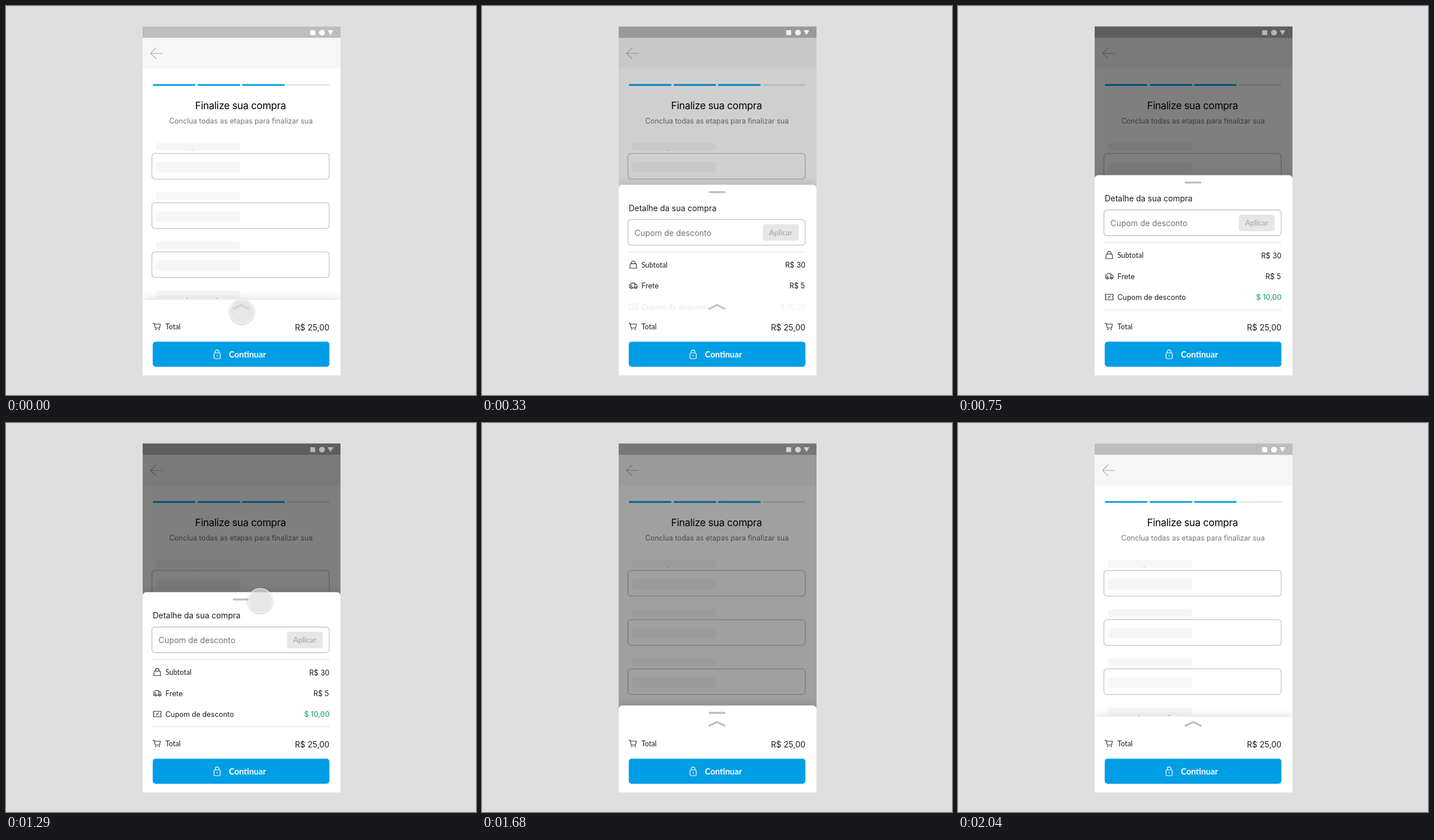
Recreate the animation shown at these times as an HTML page. Size 815x675 px, loop 2280 ms.

```html
<!DOCTYPE html>
<html lang="pt-BR">
<head>
<meta charset="utf-8">
<title>Finalize sua compra</title>
<style>
  html, body { margin: 0; width: 100%; height: 100%; overflow: hidden; background: #dfdfdf; }
  svg { display: block; width: 815px; height: 675px; }
  text { font-family: Inter, Roboto, sans-serif; font-size: 12.5px; fill: #1c1c1c; }
  .label { font-family: Lato, "Open Sans", sans-serif; font-size: 12.4px; }
  .bold { font-family: Lato, "Open Sans", sans-serif; font-weight: 700; }
  .end { text-anchor: end; }
  .mid { text-anchor: middle; }
  .line { fill: none; stroke: #2b2b2b; stroke-width: 1.1; stroke-linejoin: round; stroke-linecap: round; }
  .field { fill: #fff; stroke: #c2c2c2; stroke-width: 1.3; }
  .rule { stroke: #e4e4e4; stroke-width: 1.2; }
  .gray { fill: none; stroke: #bfbfbf; stroke-width: 3.4; stroke-linecap: round; stroke-linejoin: round; }
  #sheetBg { filter: drop-shadow(0 -4px 7px rgba(0, 0, 0, .1)); }
  #touch { filter: drop-shadow(0 1px 1.5px rgba(0, 0, 0, .35)); }
</style>
</head>
<body>
<svg viewBox="0 0 815 675">
  <clipPath id="phone"><rect x="237" y="35.5" width="343" height="605.5"/></clipPath>
  <g clip-path="url(#phone)">
    <rect x="237" y="35" width="343" height="607" fill="#fff"/>
    <rect x="237" y="35" width="343" height="20.5" fill="#bdbdbd"/>
    <rect x="237" y="55.5" width="343" height="53" fill="#f6f6f6"/>
    <path d="M271.5 82.3H250.7M260.5 72.5L250.5 82.3L260.5 91.5" fill="none" stroke="#aaa" stroke-width="1.1"/>
    <g id="steps" stroke-width="3" stroke-linecap="round"></g>
    <text x="328" y="179" style="font-size:17.3px;letter-spacing:-.29px;fill:#000">Finalize sua compra</text>
    <text x="283" y="203.5" style="font-size:12.45px;fill:#757575">Conclua todas as etapas para finalizar sua</text>
    <g id="form"></g>
    <path d="M322 250.5h1.2M313 507.5h1.5M365 507.5h2" stroke="#777"/>
    <rect id="shade" x="237" y="35" width="343" height="607"/>
    <path d="M527.5 42h8.6v8.6h-8.6zM557.8 42h9.8l-4.9 8.4z" fill="#fff" class="status"/>
    <circle cx="547.9" cy="46.2" r="5" fill="#fff" class="status"/>

    <g id="sheet">
      <rect id="sheetBg" x="237" y="293.5" width="343" height="420" rx="6" fill="#fff"/>
      <path class="gray" d="M394.7 306.3H420.5"/>
      <text x="254.5" y="339" style="font-size:13.95px">Detalhe da sua compra</text>
      <rect class="field" x="253" y="354" width="307.5" height="44.5" rx="5.5"/>
      <text x="264.5" y="382" style="font-size:13.95px;fill:#757575">Cupom de desconto</text>
      <rect x="487" y="362" width="62" height="28.7" rx="4" fill="#e6e6e6"/>
      <text class="bold mid" x="518" y="381.3" style="font-size:13px;fill:#b2b2b2">Aplicar</text>
      <path class="rule" d="M254 410.2H561M254 527.2H561"/>

      <path class="line" d="M257.3 430.5H267.2L268.3 438.3H256.2ZM259.2 430.3V429a3.1 3.1 0 0 1 6.2 0V430.3"/>
      <text class="label" x="276.5" y="437">Subtotal</text>
      <text class="end" x="561" y="437.5">R$ 30</text>

      <path class="line" d="M258 464.2H265V472.2H261.5M257 472.2H255.8V469.5M265 466.2H267.4L269 469V472.2H268M255 466.7H259M256.5 469H260"/>
      <circle class="line" cx="259.2" cy="472.4" r="1.5"/>
      <circle class="line" cx="266.3" cy="472.4" r="1.5"/>
      <text x="276.5" y="473.5">Frete</text>
      <text class="end" x="560" y="473.5">R$ 5</text>

      <path class="line" d="M255.5 500.3H269V503.2Q266.8 505 269 506.8V509.7H255.5V506.8Q257.7 505 255.5 503.2ZM260.3 507.2L264.3 502.8"/>
      <path class="line" d="M260.4 503.3h.2M264 506.8h.2" stroke-width="1.6"/>
      <text x="276.5" y="510" style="font-size:12.4px">Cupom de desconto</text>
      <text class="end" x="561" y="510" style="font-weight:500;fill:#27a974">$ 10,00</text>
    </g>

    <g id="cover">
      <rect x="237" y="510" width="343" height="132" fill="#fff"/>
      <path class="gray" d="M394.5 525.2L407.6 518.8L420.8 525.2"/>
    </g>

    <path class="line" d="M254.7 550.5H256.8L258.8 558.7H266.3L267.8 552H257.4"/>
    <path class="line" d="M259.6 561.3h.2M265.6 561.3h.2" style="stroke-width:1.9"/>
    <text class="label" x="276.5" y="561">Total</text>
    <text class="end" x="561" y="562.5" style="font-size:14.05px">R$ 25,00</text>
    <rect x="254.5" y="582.5" width="306.3" height="43.5" rx="5" fill="#009ee5"/>
    <g fill="none" stroke="#fff" stroke-width="1.2">
      <rect x="360.7" y="602" width="10.8" height="10" rx="1.8"/>
      <path d="M362.9 602V600a3.2 3.2 0 0 1 6.4 0V602M366.1 605.5V608"/>
    </g>
    <text class="bold" x="386.5" y="610" style="font-size:14.5px;fill:#fff">Continuar</text>
  </g>
  <circle id="touch" r="21" fill="#fafafa" fill-opacity=".6" stroke="#fff" stroke-width="1.2"/>
</svg>
<script>
  const LOOP = 2280, STEP = 30, OPEN = 120, CLOSE = 1470, TAP = 1290, TRAVEL = 216.5;
  const $ = id => document.getElementById(id);
  const status = document.querySelectorAll('.status');

  $('steps').innerHTML = [256, 333.7, 410.6, 488.4].map((x, i) =>
    `<path d="M${x} 137h71.2" stroke="${i < 3 ? '#009ee3' : '#e5e5e5'}"/>`).join('');

  const bar = (y, h) => `<rect x="260" y="${y}" width="146.3" height="${h}" rx="4.5" fill="#f6f6f6"/>`;
  $('form').innerHTML = [0, 1, 2, 3].map(i => {
    const y = 237.5 + i * 85.4;
    return bar(y, 13.5) +
      `<rect class="field" x="253" y="${y + 18.4}" width="307.5" height="44.5" rx="5.5"/>` +
      bar(y + 33, 18.4);
  }).join('');

  // quintic ease in and out
  function ease(x) {
    x = Math.min(1, Math.max(0, x));
    return x < .5 ? 16 * x ** 5 : 1 - 16 * (1 - x) ** 5;
  }

  function draw(now) {
    const t = Math.floor(now % LOOP / STEP) * STEP;
    const opened = (up, down) => ease((t - OPEN) / up) - ease((t - CLOSE) / down);
    const shade = opened(445, 480);

    $('sheet').setAttribute('transform', `translate(0 ${TRAVEL * (1 - opened(320, 326))})`);
    $('shade').setAttribute('opacity', .5 * shade);
    $('cover').setAttribute('opacity', 1 - opened(580, 210));
    status.forEach(s => s.setAttribute('opacity', 1 - .45 * shade));

    const tapped = t >= TAP && t < CLOSE;
    $('touch').setAttribute('visibility', t < OPEN || tapped ? 'visible' : 'hidden');
    $('touch').setAttribute('transform', tapped ? 'translate(441 308)' : 'translate(409 530)');
  }

  const start = performance.now();
  function tick() {
    draw(performance.now() - start);
    requestAnimationFrame(tick);
  }
  tick();
</script>
</body>
</html>
```
